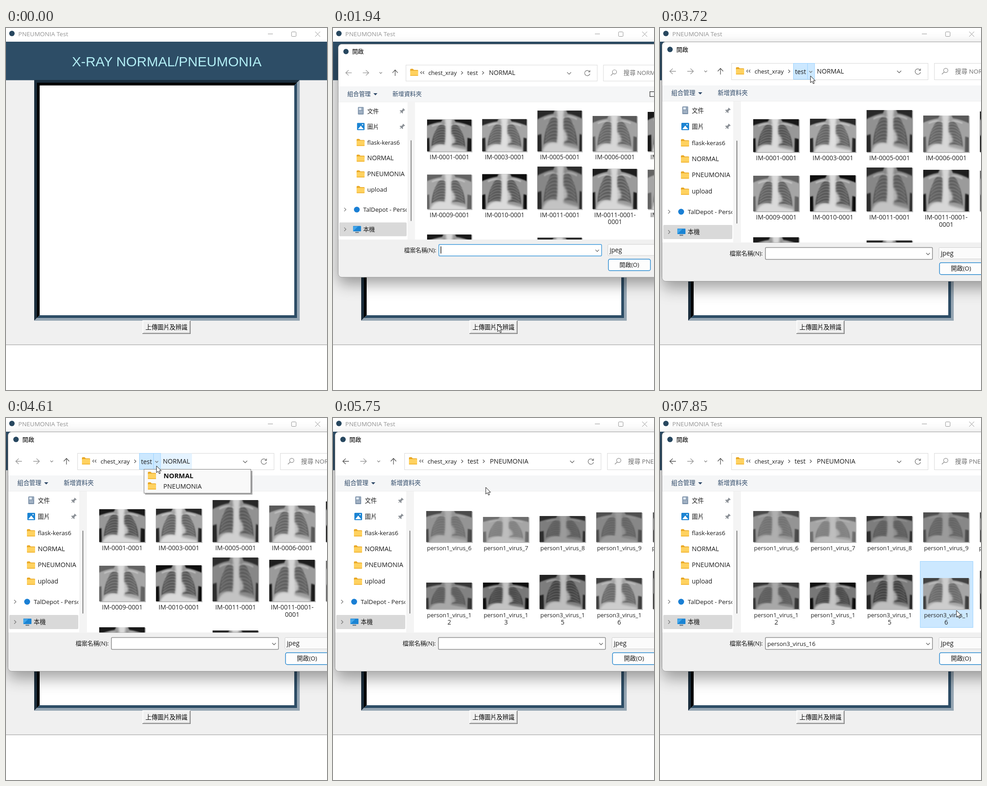
An HTML page for the animation above (8 s loop, 706 by 794 pixels).

```html
<!DOCTYPE html>
<html lang="zh-Hant">
<head>
<meta charset="utf-8">
<title>PNEUMONIA Test</title>
<style>
  html, body { margin: 0; width: 100%; height: 100%; overflow: hidden; background: #fff; }
  svg { display: block; }
  #stage { width: 706px; height: 794px; }
  text { font-family: "Open Sans", "Noto Sans CJK TC", "Noto Sans CJK", "Noto Sans", sans-serif; white-space: pre; }
  .head { font-family: "Liberation Sans", Arial, sans-serif; }
</style>
</head>
<body>
<svg id="stage" viewBox="0 0 706 794" xmlns="http://www.w3.org/2000/svg"></svg>
<script>
const LOOP = 8000;
const COL = 124.6;

// ---- drawing helpers ----
const rect = (x, y, w, h, fill, more = '') =>
  `<rect x="${x}" y="${y}" width="${w}" height="${h}" fill="${fill}" ${more}/>`;
const line = (d, stroke, width = 1.2, more = '') =>
  `<path d="${d}" fill="none" stroke="${stroke}" stroke-width="${width}" ${more}/>`;
const shape = (d, fill, more = '') => `<path d="${d}" fill="${fill}" ${more}/>`;
const dot = (x, y, r, fill) => `<circle cx="${x}" cy="${y}" r="${r}" fill="${fill}"/>`;
const text = (x, y, str, size = 13.2, fill = '#1a1a1a', more = '') =>
  `<text x="${x}" y="${y}" font-size="${size}" fill="${fill}" ${more}>${str}</text>`;
const mid = 'text-anchor="middle"';
const group = (id, body, more = '') => `<g id="${id}" ${more}>${body}</g>`;
const right = (x, y, s = 3.5, c = '#555') => line(`M${x - s / 2} ${y - s}l${s} ${s}l${-s} ${s}`, c, 1.3);
const left = (x, y, s = 3, c = '#555') => line(`M${x + s / 2} ${y - s}l${-s} ${s}l${s} ${s}`, c, 1.3);
const down = (x, y, s = 4.5, c = '#666') => line(`M${x - s} ${y - s / 2}l${s} ${s}l${s} ${-s}`, c, 1.3);
const grey = v => `rgb(${v},${v},${v})`;

const folder = (x, y) =>
  shape(`M${x} ${y + 2}q0-2 2-2h4l2.500 2.500h8q1.500 0 1.500 1.500v3h-18z`, '#e9a825') +
  rect(x, y + 4, 18, 12, '#ffd260', 'rx="1.500"') +
  rect(x, y + 14, 18, 2, '#f3b93c', 'rx="1"');

const pin = (x, y) =>
  `<g transform="translate(${x} ${y}) rotate(45)">` +
  shape('M-3-6h6v1.500l-1 .5v4l2.500 2v1.500h-9v-1.500l2.500-2v-4l-1-.5z', '#8b9096') +
  line('M0 3v4', '#8b9096') + '</g>';

// ---- main window ----
function mainWindow() {
  const controls = 'M576 13h11M680 8l11 11M691 8l-11 11M629.500 8.500h7q1.500 0 1.500 1.500v7q0 1.500-1.500 1.500h-7q-1.500 0-1.500-1.500v-7q0-1.500 1.500-1.500z';
  return rect(0, 0, 706, 794, '#fff') +
    dot(13, 12, 6, '#27475f') +
    group('caption', text(27, 18, 'PNEUMONIA Test', 13.5, 'currentColor') + line(controls, 'currentColor', 1)) +
    rect(0, 30, 706, 664, '#f0f0f0') +
    rect(0, 694, 706, 1.5, '#b4b4b4') +
    rect(0, 30, 706, 84.5, '#2d4d66') +
    text(353.5, 84, 'X-RAY NORMAL/PNEUMONIA', 30.1, '#b2eef5', mid + ' class="head"') +
    shape('M62 114H646L640 120H68V636L62 642z', '#1b2e3d') +
    shape('M646 114V642H62L68 636H640V120z', '#96a6b3') +
    shape('M68 120H640L634 126H74V630L68 636z', '#000') +
    shape('M640 120V636H68L74 630H634V126z', '#2d4d66') +
    rect(74, 126, 560, 504, '#fff') +
    rect(300, 641, 106, 30, '#f0f0f0') +
    line('M301 670V642H405', '#fff', 1.5, 'id="bevelA"') +
    line('M300 670.300H405.300V642', '#747474', 1.5, 'id="bevelB"') +
    line('M302 668.800H403.800V643', '#b4b4b4', 1) +
    group('upload', text(353, 661, '上傳圖片及辨識', 13.2, '#000', mid));
}

// ---- thumbnails ----
// Tones: backdrop, body, lungs, bone.
function xray(x, y, w, h, [bg, body, lung, bone], lean = 0) {
  let ribs = '';
  for (let i = 0; i < 7; i++) {
    const ry = 20 + i * 6.5;
    ribs += `M${20 - i} ${ry + 8}Q30 ${ry - 6} 45 ${ry}M${80 + i} ${ry + 8}Q70 ${ry - 6} 55 ${ry}`;
  }
  const c = grey(bone);
  return rect(x + 1, y + 1, w + 1, h + 1, '#b9b9b9') +
    `<svg x="${x}" y="${y}" width="${w}" height="${h}" viewBox="0 0 100 80" preserveAspectRatio="none">` +
    rect(0, 0, 100, 80, grey(bg)) +
    `<g filter="url(#soft)" transform="translate(${lean} 0)">` +
    shape('M-8 20Q14 9 34 6L39-5H61L66 6Q86 9 108 20V50L93 46L92 88H8L7 46L-8 50z', grey(body)) +
    shape('M40 11Q27 11 20 30Q12 50 12 67Q27 59 42 64Q46 40 44 17z', grey(lung)) +
    shape('M60 11Q73 11 80 30Q88 50 88 69Q73 61 58 64Q54 40 56 17z', grey(lung)) +
    line(ribs, c, 2, 'opacity=".32"') +
    line('M13 17Q31 8 46 15M87 17Q69 8 54 15', c, 2.5, 'opacity=".7"') +
    '</g>' +
    `<g filter="url(#haze)" transform="translate(${lean} 0)">` +
    shape('M41-8H59L56 16L57 88H43L44 16z', c) +
    shape('M46 30Q64 36 66 56Q58 66 42 62z', c, 'opacity=".8"') +
    shape('M10 78Q20 58 42 63Q62 70 90 76V92H10z', c) +
    '</g></svg>';
}

function row(tops, bottom, tones) {
  return tops.map((top, i) =>
    xray(205 + i * COL, top, 100.5, bottom - top, tones[i % tones.length], (i * 7) % 5 - 2)).join('');
}
const label = (i, y, str, size) => text(255.8 + i * COL, y, str, size, '#222', mid);

function normalList() {
  const names = ['IM-0001-0001', 'IM-0003-0001', 'IM-0005-0001', 'IM-0006-0001', 'IM-0007-0001',
    'IM-0009-0001', 'IM-0010-0001', 'IM-0011-0001', 'IM-0011-0001-', 'IM-0013-0001'];
  const tones = [[25, 152, 78, 218], [40, 165, 95, 222], [40, 145, 85, 208], [90, 162, 98, 215]];
  return row([200, 199, 180, 192, 183], 272, tones) +
    row([324, 323, 306, 311, 313], 402, [[100, 165, 92, 218], [15, 150, 82, 218], [45, 135, 88, 195], [30, 155, 90, 215]]) +
    xray(205, 459, 100.5, 75, tones[0]) + xray(205 + 2 * COL, 466, 100.5, 75, tones[2]) +
    names.map((n, i) => label(i % 5, i < 5 ? 290 : 420, n, 14)).join('') +
    label(3, 436, '0001', 14);
}

function virusList() {
  const first = [6, 7, 8, 9, 10].map((n, i) => label(i, 290, `person1_virus_${n}`, 12.95)).join('');
  const second = ['1_virus_12', '1_virus_13', '3_virus_15', '3_virus_16', '3_virus_17'].map((n, i) =>
    label(i, 437, 'person' + n.slice(0, -1), 12.95) + label(i, 453, n.slice(-1), 14)).join('');
  return row([204, 217, 215, 207, 207], 272, [[75, 148, 112, 175], [110, 165, 125, 190], [45, 125, 90, 155], [80, 135, 98, 155]]) +
    row([361, 361, 344, 351, 335], 419, [[55, 130, 88, 168], [15, 120, 65, 195], [35, 125, 62, 190], [65, 165, 102, 205]]) +
    first + second;
}

// ---- file dialog ----
function sidebar() {
  const rowY = i => 181 + i * 35.4;
  let s = rect(7, 0, 152, 31, '#e5f3ff', 'id="sideHover" rx="2"') + rect(7, 432, 152, 31, '#d9d9d9', 'rx="2"');
  s += rect(49, 172, 13, 17, '#8296ac', 'rx="1.500"') + rect(51, 174, 6, 5, '#dfe8f2') +
    line('M51 182h9M51 185h9M58.500 175h2M58.500 178h2', '#dfe8f2', 1);
  s += rect(47, 208, 17, 16, '#1b84d3', 'rx="1.500"') + shape('M49 222l6.500-8l6.500 8z', '#fff') + dot(59.5, 212, 1.4, '#fff');
  s += text(70, 186, '文件') + text(70, 221, '圖片') + pin(149, 181) + pin(149, 216);
  [['flask-keras6', 13.3], ['NORMAL', 14.2], ['PNEUMONIA', 14.1], ['upload', 13.8]].forEach(([name, size], i) => {
    s += folder(46, rowY(i + 2) - 8) + text(70, rowY(i + 2) + 4.7, name, size);
  });
  s += right(20, 403, 4, '#777') + dot(46.5, 403, 6.5, '#1a7fd4') + text(61, 407.5, 'TalDepot - Personal', 13.5);
  s += right(20, 447.5, 4, '#777') + rect(38, 440, 18, 12, '#1b84d3', 'rx="1"') +
    shape('M38 452V441h11z', '#43a6ea') + rect(43, 453.5, 8, 2, '#5d6b78') + text(61, 452, '本機');
  return `<g clip-path="url(#sideClip)">${s}</g>`;
}

function dropdown() {
  return rect(306, 116, 236, 52, '#000', 'opacity=".35"') +
    rect(303.5, 112.5, 235, 52.5, '#f9f9f9', 'stroke="#7d7d7d"') +
    rect(305, 115, 232, 24, '#90c8f6', 'id="menuHover"') +
    folder(312, 118) + folder(312, 141) +
    text(346.5, 132, 'NORMAL', 14.7, '#111', 'font-weight="700"') + text(346, 155, 'PNEUMONIA', 14.1);
}

function dialog() {
  const frame = 'x="4.500" y="30.500" width="900" height="525" rx="8"';
  let s = `<rect ${frame} fill="#f0f0f0" filter="url(#shade)"/>` +
    '<g clip-path="url(#dlgClip)">' + rect(4, 30, 900, 96, '#fff') +
    rect(4, 126, 900, 34, '#f5f6f7') + rect(4, 160, 900, 310.5, '#fff') +
    rect(4, 160, 900, 1, '#ececec') + rect(161, 161, 17, 309.5, '#f4f4f4') + '</g>' +
    `<rect ${frame} fill="none" stroke="#9a9a9a"/>`;
  s += dot(22, 47, 6, '#27475f') + text(36, 52, '開啟', 13, '#000');
  s += line('M35 95H22M28 89l-6.500 6l6.500 6', '#999', 1.3, 'id="back"') +
    line('M60 95h13M67 89l6.500 6l-6.500 6', '#999', 1.3) + down(100.5, 95, 3, '#888') +
    line('M133 102V89M127 95l6-6.500l6 6.500', '#555', 1.3);
  s += rect(157.5, 77.5, 432, 36, '#fff', 'stroke="#d9d9d9"') +
    rect(293.5, 77.5, 46.5, 35, '#cce8ff', 'id="crumbTest" stroke="#99d1ff"') +
    line('M324.500 78v34', '#99d1ff', 1, 'id="crumbSplit"') +
    rect(341, 77.5, 68, 35.5, '#e5f3ff', 'id="crumbLast"') +
    folder(167, 86) + left(192, 94.5) + left(197, 94.5) +
    text(208, 99.5, 'chest_xray', 13.1) + right(284, 95) + text(296, 99.5, 'test', 13.8, '#1a1a1a', 'id="test"') +
    group('sepRight', right(331.5, 95)) + group('sepDown', down(331.5, 96, 3.2)) +
    text(345, 99.5, '', 14.15, '#1a1a1a', 'id="path"') + down(526, 96) +
    line('M572 92A6 6 0 1 0 573 97M573 89v4h-4', '#777', 1.3);
  s += rect(603.5, 77.5, 200, 36, '#fff', 'stroke="#d9d9d9"') +
    '<circle cx="628.500" cy="93" r="4.700" fill="none" stroke="#888" stroke-width="1.200"/>' +
    line('M625 96.500l-5 5', '#888') + text(649, 99.5, '', 13.5, '#6d6d6d', 'id="search"');
  s += text(25, 147, '組合管理', 13.2, '#2c4766') + shape('M84 141h9l-4.500 4.800z', '#2c4766') +
    text(127, 147, '新增資料夾', 13.2, '#2c4766') + line('M708.500 137.500h14v11h-14z', '#333', 1.3);
  s += sidebar() + rect(168, 247, 2.2, 182, '#8a8a8a', 'rx="1"') +
    group('arrows', shape('M165 173l4-5l4 5zM165 460l4 5l4-5z', '#dedede'));
  s += '<g clip-path="url(#listClip)">' + rect(0, 0, 116, 129, '#e5f3ff', 'id="cell"') +
    rect(572.3, 314.5, 116, 145, '#cce8ff', 'id="picked" stroke="#99d1ff"') +
    group('normal', normalList()) + group('virus', virusList()) + '</g>';
  s += text(226, 499, '檔案名稱(N):', 13, '#1a1a1a', 'text-anchor="end"') +
    rect(231.8, 481.5, 367.5, 26, '#fff', 'id="field" rx="2" stroke-width="1.500"') + down(589.5, 495.5, 4) +
    line('M236.500 486v16', '#000', 1.4, 'id="caret"') +
    text(236, 499.5, 'person3_virus_16', 13, '#1a1a1a', 'id="file"') +
    rect(613.5, 481.5, 150, 25, '#fbfbfb', 'rx="2" stroke="#cfcfcf"') + text(617.5, 499, 'jpeg', 14.2) +
    rect(614.7, 514.7, 95, 26, '#fdfdfd', 'rx="4" stroke="#2b8bd0" stroke-width="1.500"') +
    text(662, 532, '開啟(O)', 13.2, '#1a1a1a', mid);
  return s + group('menu', dropdown());
}

const clip = (id, x, y, w, h, rx = 0) =>
  `<clipPath id="${id}"><rect x="${x}" y="${y}" width="${w}" height="${h}" rx="${rx}"/></clipPath>`;
const blur = (id, r) =>
  `<filter id="${id}" x="-20%" y="-20%" width="140%" height="140%"><feGaussianBlur stdDeviation="${r}"/></filter>`;
const stage = document.getElementById('stage');
stage.innerHTML = '<defs>' + blur('soft', 1.2) + blur('haze', 2.2) +
  '<filter id="shade" x="-10%" y="-10%" width="120%" height="130%"><feDropShadow dx="0" dy="15" stdDeviation="17" flood-opacity=".37"/></filter>' +
  clip('sideClip', 4, 160, 155, 310.5) + clip('listClip', 178, 160, 720, 310.5) + clip('dlgClip', 4.5, 30.5, 900, 525, 8) +
  '</defs>' + mainWindow() + group('dialog', dialog()) +
  group('cursor', shape('M0 0V15L3.500 11.800L6 17.200L8.300 16.200L6 10.900H10.600Z', '#fff', 'stroke="#111" stroke-linejoin="round"'));

const el = {};
stage.querySelectorAll('[id]').forEach(n => el[n.id] = n);
const show = (id, on) => el[id].style.display = on ? '' : 'none';
const set = (id, attrs) => { for (const k in attrs) el[id].setAttribute(k, attrs[k]); };

// ---- motion ----
// The pointer moves in discrete steps: start, end, number of steps, way points.
const MOVES = [
  [390, 740, 6, [602, 757], [515, 714], [430, 675], [385, 659], [367, 653], [362, 651]],
  [2270, 3030, 12, [330, 610], [240, 510], [165, 400], [140, 290], [150, 215], [190, 185],
    [235, 163], [285, 145], [330, 125], [360, 108], [380, 95], [386, 90]],
  [3110, 3520, 6, [384, 92], [331, 105]],
  [4700, 4800, 2, [330, 100], [329, 95]],
  [4870, 5610, 10, [329, 101], [331, 122], [335, 145], [337, 156], [336, 152], [336, 152]],
  [6020, 6500, 8, [360, 157], [420, 167], [480, 184], [535, 205], [585, 226], [626, 246], [668, 270], [715, 290]],
  [6700, 6700, 1, [715, 380]],
  [7100, 7170, 2, [672, 402], [639, 410]],
  [7850, 7850, 1, [652, 422]]
];

const stepAt = (t, t0, t1, n) =>
  n < 2 ? 0 : Math.min(n - 1, Math.floor((t - t0) / (t1 - t0) * (n - 1) + 0.1)) / (n - 1);

function pointer(t) {
  const move = MOVES.filter(m => t >= m[0]).pop();
  if (!move) return null;
  const [t0, t1, n, ...pts] = move;
  const f = stepAt(t, t0, t1, n) * (pts.length - 1);
  const i = Math.floor(f), a = pts[i], b = pts[Math.min(i + 1, pts.length - 1)];
  return [0, 1].map(k => a[k] + (b[k] - a[k]) * (f - i));
}

function hoverCell(x, y) {
  const c = Math.floor((x - 198.2) / COL);
  const inside = x > 198 && x - 198.2 - c * COL < 116.5;
  const r = y > 167 && y < 296 ? 0 : y > 314 && y < 459 ? 1 : -1;
  show('cell', inside && r >= 0);
  set('cell', { x: 198.2 + c * COL, y: r ? 314 : 167, height: r ? 145 : 129 });
}

function render(t) {
  const p = pointer(t);
  show('cursor', p);
  const [x, y] = p || [0, 0];
  set('cursor', { transform: `translate(${x} ${y})` });

  const pressed = t >= 1470 && t < 1670;
  el.caption.style.color = pressed ? '#111' : '#949494';
  set('upload', { transform: pressed ? 'translate(1 1)' : '' });
  set('bevelA', { stroke: pressed ? '#747474' : '#fff' });
  set('bevelB', { stroke: pressed ? '#fff' : '#747474' });

  const open = t >= 1670;
  show('dialog', open);
  if (!open) return;
  const grow = stepAt(t, 1670, 2060, 6);
  const gap = 0.1 * (1 - grow) ** 1.46;
  set('dialog', {
    transform: `translate(${271 * gap} ${221 * gap}) scale(${1 - gap})`,
    opacity: Math.min(1, 0.25 + grow * 1.6)
  });

  const focused = t < 3720;
  set('field', { stroke: focused ? '#3f9adb' : '#8c8c8c' });
  show('caret', focused && Math.floor((t - 1370) / 530) % 2);
  show('arrows', t >= 2400 && t < 3030);

  const side = t > 2270 && x < 160 && y > 164 && y < 375;
  show('sideHover', side);
  if (side) set('sideHover', { y: 165.5 + Math.floor((y - 163.5) / 35.4) * 35.4 });

  // breadcrumb
  const held = t >= 3720 && t < 5680;
  const onTest = t >= 3380 && t < 5680;
  show('crumbTest', onTest);
  show('crumbSplit', onTest);
  set('crumbTest', { fill: held ? '#cce8ff' : '#e5f3ff' });
  show('crumbLast', (t >= 3110 && t < 3380) || (t >= 4050 && t < 4740));
  set('test', { transform: held ? 'translate(1 1)' : '' });
  show('sepDown', held);
  show('sepRight', !held);

  const fade = t < 5450 ? (t - 4000) / 200 : (5610 - t) / 160;
  show('menu', t >= 4050 && t < 5610);
  set('menu', { opacity: Math.max(0, Math.min(1, fade)) });
  show('menuHover', t > 4870 && y > 115);
  set('menuHover', { y: y > 139 ? 139 : 115 });

  // folder contents
  const virus = t >= 5680;
  const name = virus ? 'PNEUMONIA' : 'NORMAL';
  el.path.textContent = name;
  el.search.textContent = '搜尋 ' + name;
  set('back', { stroke: virus ? '#555' : '#999' });
  show('normal', !virus);
  show('virus', t >= 5750);
  show('picked', t >= 7570);
  show('file', t >= 7640);
  if (t >= 6020 && t < 7570) hoverCell(x, y); else show('cell', false);
}

const start = performance.now();
function tick() {
  render((performance.now() - start) % LOOP);
  requestAnimationFrame(tick);
}
tick();
</script>
</body>
</html>
```
